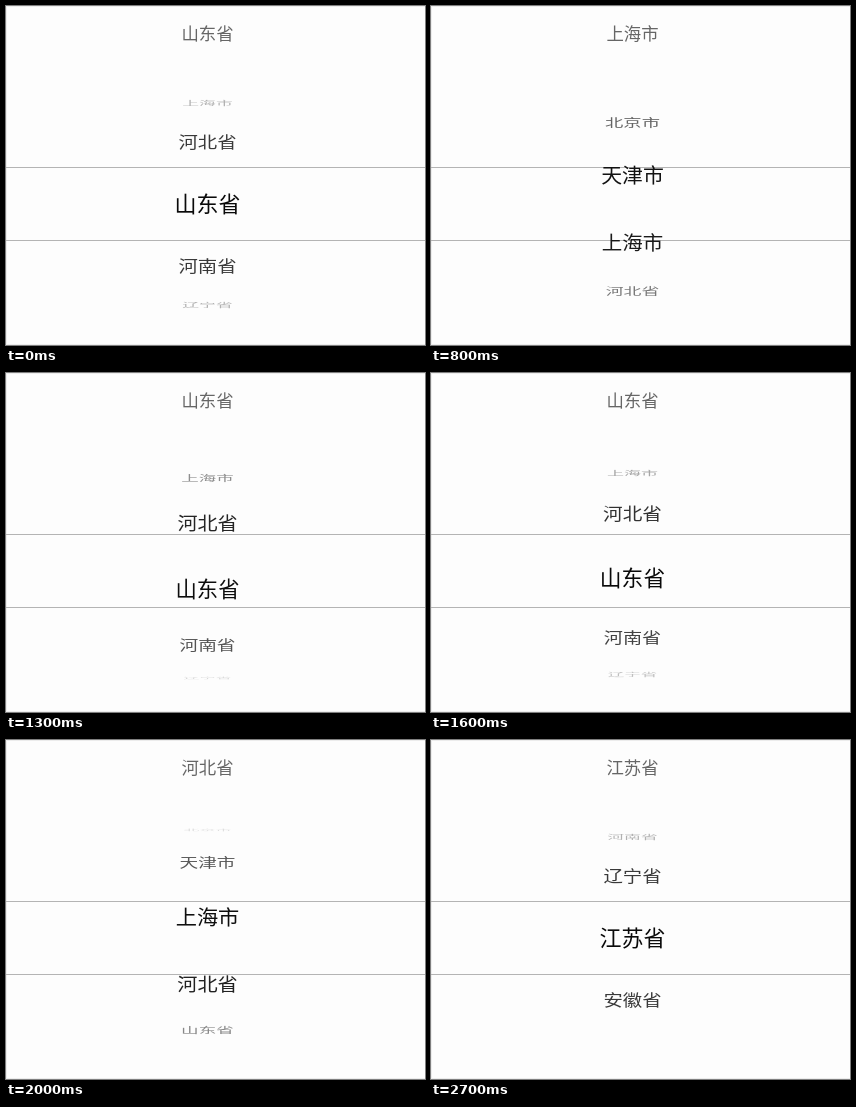
These frames come from a looping animation (419 px wide and 339 px high, 2.8 s). An HTML page with a canvas:

```html
<!DOCTYPE html>
<html lang="zh-CN">
<head>
<meta charset="utf-8">
<title>Province wheel</title>
<style>
  html, body { margin: 0; width: 100%; height: 100%; overflow: hidden; background: #fdfdfd; }
  canvas { display: block; }
</style>
</head>
<body>
<canvas id="stage" width="419" height="339"></canvas>
<script>
const ctx = document.getElementById('stage').getContext('2d');
const provinces = ['北京市', '天津市', '上海市', '河北省', '山东省', '河南省', '辽宁省', '江苏省', '安徽省'];
const LOOP = 2800, STEP = 100;
const CENTER_X = 201.5, CENTER_Y = 198;

// [time in ms, wheel position in rows]
const keys = [
  [0, 4], [300, 3.95], [500, 3.39], [800, 1.42], [950, 1], [1300, 3.74],
  [1600, 3.91], [1640, 3.92], [2000, 2.3], [2060, 2.25], [2400, 6.95], [2600, 7], [LOOP, 7]
];

const slope = i => (keys[i + 1][1] - keys[i][1]) / (keys[i + 1][0] - keys[i][0]);

// Monotone tangent: flat at turning points, harmonic mean elsewhere
function tangent(i) {
  if (i === 0 || i === keys.length - 1) return 0;
  const a = slope(i - 1), b = slope(i);
  return a * b > 0 ? 2 * a * b / (a + b) : 0;
}

function positionAt(time) {
  const i = keys.findIndex((key, n) => time < keys[n + 1][0]);
  const [t0, p0] = keys[i], [t1, p1] = keys[i + 1];
  const span = t1 - t0, s = (time - t0) / span, r = 1 - s;
  return p0 * (1 + 2 * s) * r * r + p1 * s * s * (3 - 2 * s)
    + span * s * r * (tangent(i) * r - tangent(i + 1) * s);
}

function drawText(text, y, size, scaleX, scaleY, color) {
  ctx.save();
  ctx.translate(CENTER_X, y);
  ctx.scale(scaleX, scaleY);
  ctx.font = `${size}px "Noto Sans CJK SC", "Noto Sans CJK", sans-serif`;
  ctx.textAlign = 'center';
  ctx.fillStyle = color;
  ctx.fillText(text, 0, size * 0.38);
  ctx.restore();
}

function drawRow(text, offset) {
  const distance = Math.abs(offset);
  if (distance >= 2.48) return;
  const y = CENTER_Y + offset * (73.5 - 11.6 * distance);
  const scale = 1 - 0.118 * distance;
  const facing = Math.cos(distance * Math.PI / 5);
  drawText(text, y, 22, scale, scale * facing, `rgba(10, 10, 10, ${facing})`);
}

function draw(time) {
  const position = positionAt(time);
  ctx.fillStyle = '#fdfdfd';
  ctx.fillRect(0, 0, 419, 339);
  ctx.strokeStyle = '#ececec';
  ctx.strokeRect(0.5, 0.5, 419, 338);
  ctx.fillStyle = '#b4b4b4';
  ctx.fillRect(0, 161, 419, 1);
  ctx.fillRect(0, 234, 419, 1);
  drawText(provinces[Math.ceil(position - 0.1)], 27.5, 17.4, 1, 1, '#666');
  provinces.forEach((name, i) => drawRow(name, i - position));
}

function tick() {
  const time = performance.now() % LOOP;
  draw(Math.floor(time / STEP) * STEP);
  requestAnimationFrame(tick);
}
tick();
</script>
</body>
</html>
```
